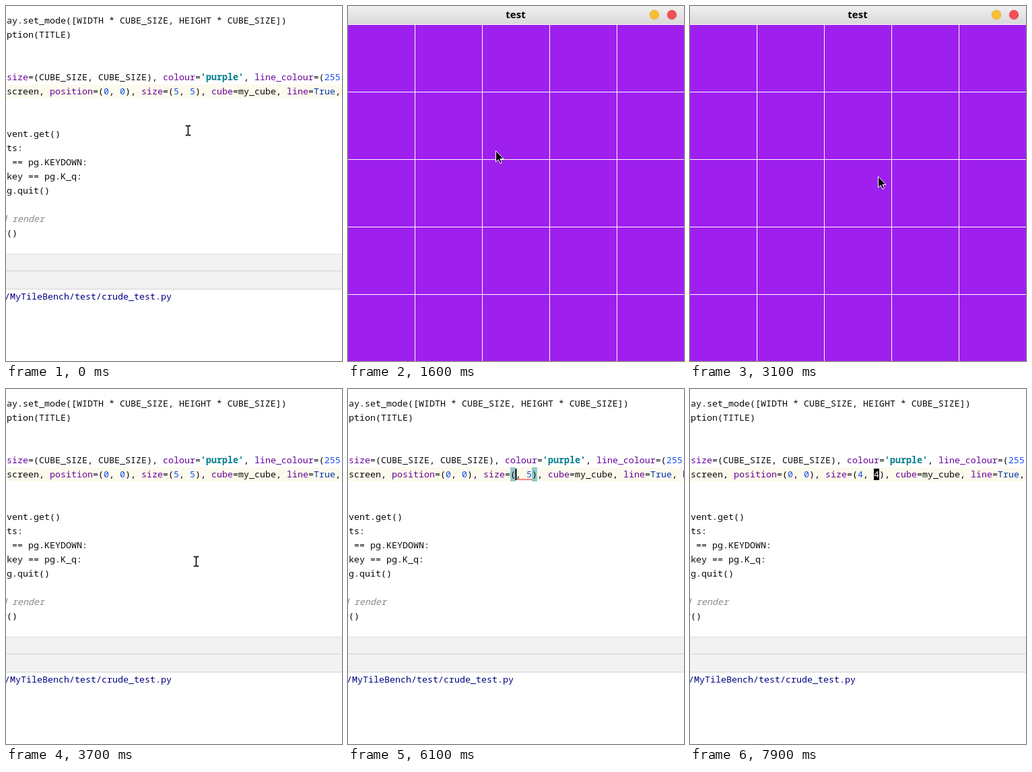
An HTML page that plays this animation: 499 px wide and 526 px high, repeating every 8 s.

```html
<!DOCTYPE html>
<html lang="en">
<head>
<meta charset="utf-8">
<title>Board test</title>
<style>
  html, body { margin: 0; width: 100%; height: 100%; overflow: hidden; background: #fff; }
  svg { display: block; width: 499px; height: 526px; }
  text { white-space: pre; }
  .code { font: 500 13.333px "Noto Sans Mono", "DejaVu Sans Mono", monospace; fill: #080808; }
  .arg { fill: #660099; }
  .num { fill: #1750eb; }
  .key { fill: #0033b3; }
  .str { fill: #007d8c; font-weight: bold; }
  .note { fill: #8c8c8c; font-style: italic; }
  .path { fill: #000080; }
  .title { font: bold 15px "Noto Sans", "Open Sans", sans-serif; text-anchor: middle; fill: #000; }
</style>
</head>
<body>
<svg viewBox="0 0 499 526" width="499" height="526">
  <defs>
    <linearGradient id="bar" x2="0" y2="1">
      <stop offset="0" stop-color="#f0f0f0"/>
      <stop offset="1" stop-color="#d9d9d9"/>
    </linearGradient>
  </defs>

  <g id="editor">
    <rect width="499" height="526" fill="#fff"/>
    <rect y="116" width="499" height="21" fill="#fcfaed"/>
    <g id="braces" fill="#93cccc">
      <rect x="241" y="116" width="8" height="21"/>
      <rect id="closing" y="116" width="8" height="21"/>
    </g>
    <g id="lines" class="code"></g>
    <path id="wave" fill="none" stroke="#f02020"/>
    <rect id="caret" y="118" width="2" height="17"/>
    <g id="block">
      <rect y="118" width="8" height="17"/>
      <text id="under" class="code" y="131" style="fill:#fff"></text>
    </g>
    <rect y="367" width="499" height="53" fill="#f2f2f2"/>
    <path d="M0 367.5H499" stroke="#dfdfdf"/>
    <path d="M0 392.5H499M0 419.5H499" stroke="#d1d1d1"/>
    <text class="code path" x="-2" y="435">/MyTileBench/test/crude_test.py</text>
    <g id="beam" fill="none">
      <path d="M-3.5-6.5H4.5M.5-6.5V7.5M-3.5 7.5H4.5" stroke="#b4b4b4" stroke-width="2.6"/>
      <path d="M-3-6.5H-1L.5-5.5 2-6.5H4M.5-5.5V6.5M-3 7.5H-1L.5 6.5 2 7.5H4" stroke="#111" stroke-width="1.3"/>
    </g>
  </g>

  <g id="board">
    <rect width="499" height="526" fill="#9e1fee"/>
    <path id="grid" stroke="#fff"/>
    <rect width="499" height="27" fill="url(#bar)"/>
    <text class="title" x="249" y="18">test</text>
    <circle cx="455" cy="13" r="6.8" fill="#f8c034" stroke="#e5aa25" stroke-width=".8"/>
    <circle cx="481" cy="13" r="6.8" fill="#f25056" stroke="#e0444a" stroke-width=".8"/>
    <path id="arrow" d="M.5.5V17L4.3 13.5 7 19.3 9.6 18.1 7 12.5H12Z" fill="#000" stroke="#fff"/>
  </g>
</svg>
<script>
const LOOP = 8000, CHAR = 8;
const $ = id => document.getElementById(id);

// Marked spans: a = argument, n = number, k = keyword, s = string, c = comment
const kinds = { a: 'arg', n: 'num', k: 'key', s: 'str', c: 'note' };
const paint = s => s.replace(/\{(\w)([^}]*)\}/g, (_, k, t) => `<tspan class="${kinds[k]}">${t}</tspan>`);

// [row, column, text]
const rows = [
  [0, -2, 'play.set_mode([WIDTH * CUBE_SIZE, HEIGHT * CUBE_SIZE])'],
  [1, 0, 'ption(TITLE)'],
  [4, 0, "{asize}=(CUBE_SIZE, CUBE_SIZE), {acolour}={s'purple'}, {aline_colour}=({n255}"],
  [5, 0, 'screen, {aposition}=({n0}, {n0}), {asize}=(<tspan id="first" class="num"></tspan>, ' +
         '<tspan id="second" class="num"></tspan>), {acube}=my_cube, {aline}={kTrue}, {aborder}'],
  [8, 0, 'vent.get()'],
  [9, 0, 'ts:'],
  [10, 1, '== pg.KEYDOWN:'],
  [11, 0, 'key == pg.K_q:'],
  [12, 0, 'g.quit()'],
  [14, -1, '{cd render}'],
  [15, -1, 'r()']
];
$('lines').innerHTML = rows.map(([r, c, s]) =>
  `<text x="${1 + c * CHAR}" y="${26 + r * 21}">${paint(s)}</text>`).join('');

let grid = 'M0 27.5H499';
for (let i = 1; i < 5; i++) grid += `M${i * 100 - 0.5} 27V526M0 ${i * 100 + 27.5}H499`;
$('grid').setAttribute('d', grid);

let wave = 'M0 135';
for (let x = 2; x <= 24; x += 2) wave += `L${x} ${x % 4 ? 133 : 135}`;
$('wave').setAttribute('d', wave);

// Pointer stops: [time, x, y]
const stops = [
  [0, 270, 184],
  [600, 254, 162], [700, 226, 130], [800, 194, 107], [900, 166, 120],
  [1000, 160, 160], [1100, 188, 200], [1200, 222, 217],
  [2100, 207, 176], [2200, 314, 111], [2300, 262, 161],
  [2500, 175, 250], [2600, 250, 426], [2700, 344, 330], [2800, 209, 213],
  [3000, 250, 238], [3100, 282, 255],
  [4100, 266, 226], [4200, 244, 188], [4300, 222, 152], [4400, 224, 137],
  [4600, 251, 134]
];

const show = (id, on) => $(id).setAttribute('display', on ? 'inline' : 'none');
const move = (id, x, y = 0) => $(id).setAttribute('transform', `translate(${x} ${y})`);

function draw(t) {
  const within = (a, b) => t >= a && t < b;
  const playing = within(1600, 3700);
  show('editor', !playing);
  show('board', playing);

  const [, x, y] = stops.filter(s => s[0] <= t).pop();
  move('beam', x, y);
  move('arrow', x - 3, y - 3);
  show('beam', t < 5500);

  const empty = within(5800, 6200) || within(6800, 6900);
  $('first').textContent = empty ? '' : t < 5800 ? '5' : '4';
  $('second').textContent = t < 7900 ? '5' : '4';

  show('braces', within(5100, 6200));
  $('closing').setAttribute('x', empty ? 273 : 281);
  show('wave', within(6100, 6500));
  move('wave', empty ? 249 : 257);

  show('caret', within(5100, 7300));
  move('caret', t < 6200 || empty ? 248.5 : 256.5);

  const col = t < 7600 ? 0 : t < 7700 ? 1 : 2;
  show('block', t >= 7300);
  move('block', 257 + col * CHAR);
  $('under').textContent = [',', ' ', t < 7900 ? '5' : '4'][col];
}

function tick() {
  draw(performance.now() % LOOP);
  requestAnimationFrame(tick);
}
tick();
</script>
</body>
</html>
```
